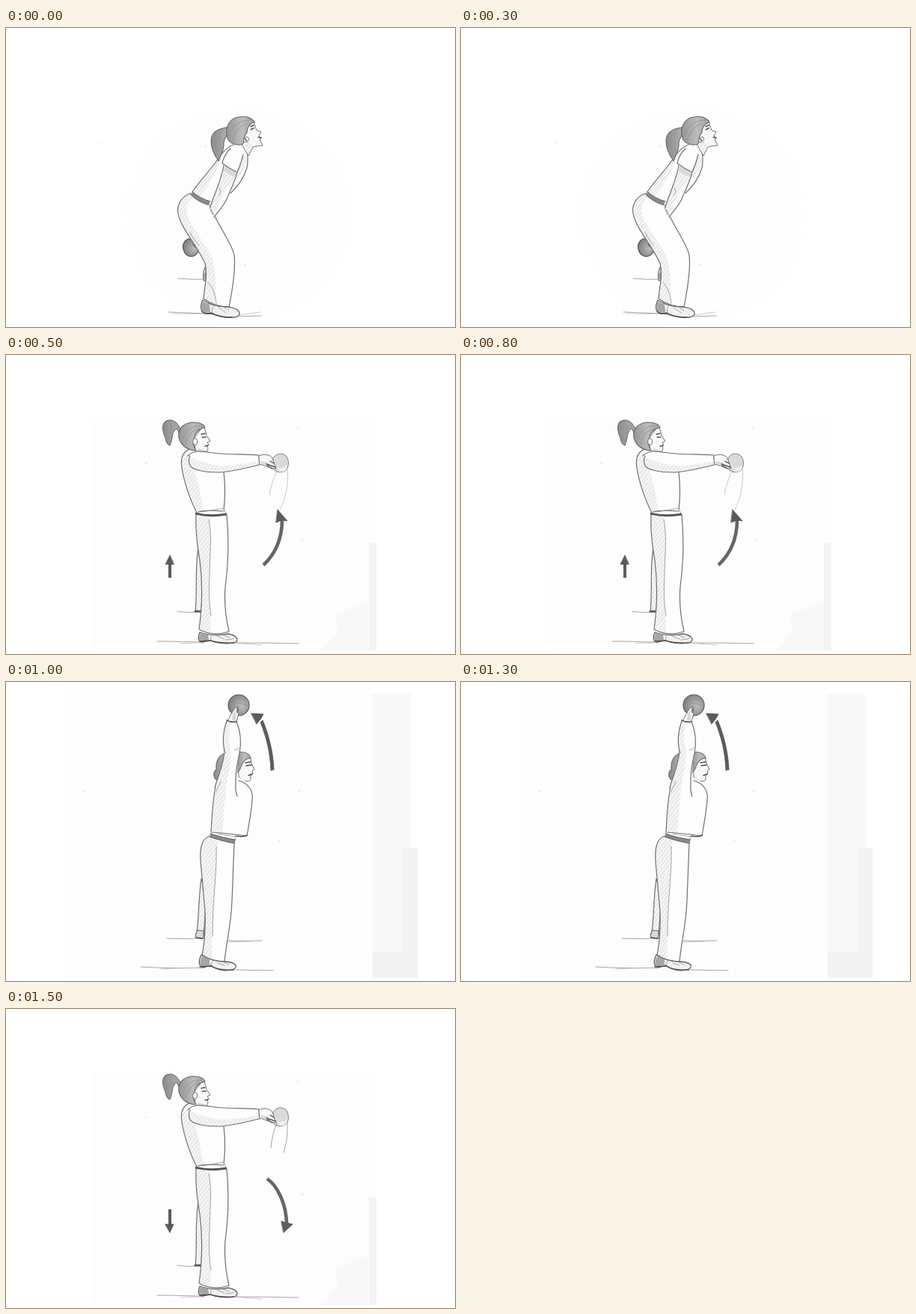
These frames come from a looping animation (600 by 400 pixels, 2 s). An HTML page:

```html
<!DOCTYPE html>
<html lang="en">
<head>
<meta charset="utf-8">
<title>Kettlebell swing</title>
<style>
html, body { margin: 0; width: 100%; height: 100%; overflow: hidden; background: #fff; }
svg { display: block; width: 600px; height: 400px; }
path { fill: none; stroke-linecap: round; stroke-linejoin: round; }
.line { stroke: #707070; stroke-width: 1.2; }
.fine { stroke: #909090; stroke-width: .8; }
.faint { stroke: #bcbcbc; stroke-width: .8; }
.dark { stroke: #505050; stroke-width: 1.4; }
.white { fill: #fdfdfd; }
.skin { fill: #f8f8f8; stroke: #707070; stroke-width: 1; }
.hatch { fill: url(#hatch); }
.shade { fill: url(#shade); }
.hair { fill: url(#hair); stroke: #6a6a6a; stroke-width: 1.1; }
.lock { fill: url(#lock); stroke: #6a6a6a; stroke-width: 1.1; }
.ball { fill: url(#ball); stroke: #585858; stroke-width: 1.2; }
.pale { fill: #dadada; stroke: #808080; stroke-width: 1; }
.shoe { fill: #f1f1f1; stroke: #606060; stroke-width: 1.3; }
.heel { fill: #a6a6a6; }
.solid { fill: #5c5c5c; stroke: #525252; stroke-width: .8; }
.belt { stroke: #565656; stroke-width: 3; stroke-linecap: butt; }
.sash { stroke: #8a8a8a; stroke-width: 5; stroke-linecap: butt; }
.rim { stroke: #606060; stroke-width: 1; }
.wide { stroke: #666; stroke-width: 4.6; stroke-linecap: butt; }
.bar { stroke: #5c5c5c; stroke-width: 4; stroke-linecap: butt; }
.paper { fill: #fdfdfd; }
.tint { fill: #f8f8f9; }
.edge { fill: #f3f3f4; }
</style>
</head>
<body>
<svg viewBox="0 0 600 400">
  <defs>
    <pattern id="hatch" width="4" height="4" patternUnits="userSpaceOnUse" patternTransform="rotate(38)">
      <rect width="4" height="4" fill="#f7f7f7"/><path d="M2 0V4" stroke="#d4d4d4" stroke-width=".9"/>
    </pattern>
    <pattern id="shade" width="3" height="3" patternUnits="userSpaceOnUse" patternTransform="rotate(32)">
      <rect width="3" height="3" fill="#e2e2e2"/><path d="M1 0V3" stroke="#c4c4c4"/>
    </pattern>
    <linearGradient id="hair">
      <stop stop-color="#969696"/><stop offset=".55" stop-color="#bcbcbc"/><stop offset="1" stop-color="#a2a2a2"/>
    </linearGradient>
    <linearGradient id="lock">
      <stop stop-color="#8c8c8c"/><stop offset="1" stop-color="#b0b0b0"/>
    </linearGradient>
    <radialGradient id="ball" cx=".65" cy=".55" r=".75">
      <stop stop-color="#bdbdbd"/><stop offset="1" stop-color="#757575"/>
    </radialGradient>
    <radialGradient id="soft">
      <stop offset=".6" stop-color="#fdfdfd"/><stop offset="1" stop-color="#fff"/>
    </radialGradient>
  </defs>
  <g id="stage"></g>
</svg>
<script>
const HOLD = 500;
const stage = document.getElementById('stage');

const box = (x, y, x2, y2) => `M${x} ${y}H${x2}V${y2}H${x}Z`;
const disc = (x, y, r) => `M${x - r} ${y}a${r} ${r} 0 1 0 ${2 * r} 0a${r} ${r} 0 1 0 ${-2 * r} 0Z`;
const specks = list => list.map(([x, y]) => `M${x} ${y}h1`).join('');

function group(parts) {
  const g = document.createElementNS('http://www.w3.org/2000/svg', 'g');
  g.innerHTML = parts.map(([cls, d]) => `<path class="${cls}" d="${d}"/>`).join('');
  return stage.appendChild(g);
}

const bend = [
  ['faint', specks([[127, 155], [319, 317], [266, 158]])],
  // ground, far foot, bell
  ['fine', 'M230 335Q249 337 266 336M217 380C245 381 270 382 280 383M306 386L341 385'],
  ['faint', 'M222 382Q250 383 266 382M312 384Q325 382 340 380'],
  ['shade line', 'M268 317C264 322 263 331 264 338L271 339L273 318Z'],
  ['heel', 'M264 328L271 326L271 338L264 338Z'],
  ['ball', 'M248 282C240 281 235 288 237 296C239 304 246 308 253 304L260 296L256 287Z'],
  ['solid', 'M250 289L256 288L258 292L253 293Z'],
  // trousers
  ['white', 'M247 220C233 226 228 238 230 248C233 267 254 288 266 315C270 330 265 348 264 362Q279 373 298 373C303 348 307 322 305 304C302 288 283 264 273 238Z'],
  ['hatch', 'M247 221C234 227 229 239 231 249C235 268 256 290 267 317C270 335 266 350 264 362L279 369C282 345 279 325 276 309C268 289 247 268 242 249Q239 234 253 226Z'],
  ['line', 'M247 221C233 226 228 238 230 248C233 267 254 288 266 315C270 330 265 348 264 362Q279 373 298 373C303 348 307 322 305 304C302 288 283 264 273 239'],
  ['fine', 'M270 340C277 348 280 358 281 369M246 273Q251 284 258 291M276 250Q272 243 272 236'],
  // shirt
  ['white', 'M313 154C299 155 292 163 285 173C274 189 261 202 249 219Q260 231 273 235L301 220C312 210 319 199 322 187Q324 169 319 157Z'],
  ['hatch', 'M297 160C285 171 270 194 250 219L258 226C272 209 283 190 290 170Z'],
  ['line', 'M314 154C299 155 292 163 285 173C274 189 261 202 249 219M319 156Q325 170 322 187C318 200 311 211 300 221'],
  // arm
  ['white', 'M291 183C287 207 276 227 273 240L279 253C286 242 293 235 298 222L309 193Z'],
  ['hatch', 'M292 184L309 193L303 206C292 216 286 232 280 246L274 240C278 225 287 207 292 184Z'],
  ['shade', 'M292 185L308 193L306 199Q298 197 291 191Z'],
  ['line', 'M291 184C287 207 276 227 273 240M309 193C304 211 298 220 295 229C290 239 284 245 278 253'],
  ['fine', 'M285 214Q289 219 284 224M275 243L278 251'],
  ['white', 'M298 160C293 167 290 175 289 181Q298 188 309 193C313 185 318 173 318 160Z'],
  ['hatch', 'M309 193C313 184 317 176 319 165L322 177C319 189 315 196 309 201Z'],
  ['line', 'M300 161C294 167 290 175 289 181Q298 188 309 193C312 186 315 178 317 169'],
  ['sash', 'M248 221Q258 231 272 234'],
  ['rim', 'M249 219Q259 228 273 232M247 223Q257 233 271 237'],
  // head
  ['lock', 'M295 133C281 135 274 141 274 151C274 161 279 171 284 178C287 169 292 164 291 153C292 146 298 144 295 133Z'],
  ['fine', 'M281 139Q278 155 284 172M288 136Q282 148 287 165'],
  ['skin', 'M331 124L333 132L335 137L341 139L338 144L341 147L339 149L343 157C338 158 333 158 330 159L324 171L314 154L319 137Z'],
  ['hair', 'M297 150C291 136 297 121 311 119C322 117 329 121 332 126C327 127 322 132 322 140C317 144 318 150 317 155C309 158 301 155 297 150Z'],
  ['fine', 'M299 143C303 129 315 123 328 123M302 150C307 138 313 129 323 128'],
  ['skin', 'M319 147C324 143 327 149 322 153L318 152'],
  ['hatch', 'M324 151L330 158L324 169L319 157Z'],
  ['dark', 'M327 136L331 134M337 146L341 147M327 132L331 130M319 148L322 151'],
  // shoe
  ['shoe', 'M263 364C259 372 260 380 266 382L275 381C284 387 296 388 305 387C313 386 314 381 309 377C305 374 300 374 296 373Q279 374 263 364Z'],
  ['heel', 'M263 366C260 373 261 379 266 381L273 380L272 370Z'],
  ['dark', 'M262 379Q265 383 275 382Q286 387 302 387'],
  ['fine', 'M276 381Q274 374 278 371M284 374L294 381M292 374L298 378']
];

const level = [
  ['paper', box(112, 82, 495, 396)],
  ['tint', 'M440 347L484 330V396H420L443 370Z'],
  ['edge', box(485, 252, 495, 396)],
  ['faint', specks([[187, 145], [390, 97], [395, 248]])],
  ['fine', 'M229 343Q245 345 253 344M202 383C225 383 245 384 262 384M304 385Q350 385 391 386'],
  ['faint', 'M233 386Q250 385 264 385M302 385L342 388'],
  // legs
  ['hatch line', 'M257 257C252 290 256 316 253 343L261 343L264 275Z'],
  ['solid', 'M253 342L261 342L261 344L252 344Z'],
  ['white', 'M254 214C253 237 256 256 259 275C263 306 262 338 258 367Q276 377 298 370C294 353 291 335 293 310C297 280 298 245 295 214Z'],
  ['hatch', 'M254 215C253 237 256 256 259 275C263 306 262 338 258 367L273 371C275 350 270 320 272 295C273 270 276 245 271 217Z'],
  ['line', 'M254 214C253 237 256 256 259 275C263 306 262 338 258 367Q276 377 298 370C294 353 291 335 293 310C297 280 298 245 295 214'],
  ['fine', 'M271 220C276 245 272 270 272 295Q270 328 274 349'],
  // shirt
  ['white', 'M243 126C235 130 233 139 235 151C238 171 247 196 255 211L291 208Q294 182 291 157Z'],
  ['hatch', 'M243 128C235 132 233 140 235 151C238 171 247 196 255 211L264 209C260 193 259 171 251 153L245 133Z'],
  ['line', 'M245 126C235 130 233 139 235 151C238 171 247 196 255 211M291 157Q294 182 291 207M257 210Q268 207 291 209'],
  ['fine', 'M262 210Q278 207 290 205M292 207L294 213'],
  ['belt', 'M253 212Q272 217 295 213'],
  // head
  ['lock', 'M233 99C229 89 220 84 213 89C207 94 210 104 213 111Q214 119 219 121C223 113 221 106 225 101Q228 95 231 104Z'],
  ['fine', 'M214 94Q215 109 219 117M219 90Q223 98 220 106M225 92L230 98'],
  ['skin', 'M264 95L267 103L268 108L273 115L269 117L271 120L269 122L270 125L268 130C262 131 257 130 253 127L251 112Z'],
  ['hair', 'M254 128C242 127 234 121 231 111C229 98 238 91 249 90C257 90 264 92 266 97C259 98 252 104 252 111C248 114 250 122 254 128Z'],
  ['fine', 'M236 113C240 99 251 94 262 95M240 119C243 106 250 100 259 98'],
  ['skin', 'M251 112C257 110 257 118 253 121L250 118'],
  ['dark', 'M262 110L267 110M261 106L266 105M266 122L270 121'],
  ['shade', 'M257 125L267 128L267 131L255 129Z'],
  // arm, hand and bell
  ['white', 'M246 132C253 126 264 129 277 131C299 134 318 132 338 134L339 147C320 151 300 157 283 157C267 157 249 154 246 148Q243 140 246 132Z'],
  ['hatch', 'M247 137C258 142 277 148 292 148C309 147 323 145 338 142V147C320 151 300 157 283 157C267 157 249 154 246 148Z'],
  ['line', 'M243 135C251 126 264 129 277 131C299 134 318 132 338 134L339 147C320 151 300 157 283 157C267 157 249 154 246 148Q243 141 246 135'],
  ['pale', 'M357 138C361 131 370 130 375 136C379 143 378 151 373 155C367 158 360 157 357 152Z'],
  ['hatch', 'M362 150Q370 153 376 146Q376 158 365 156Z'],
  ['skin', 'M338 135C345 131 354 134 356 138L359 147L361 152C355 153 348 148 339 146Z'],
  ['shade', 'M341 142L350 144L354 149L340 145Z'],
  ['dark', 'M348 146L360 150M353 142L358 145M349 148L356 152'],
  // shoe
  ['shoe', 'M259 371C256 378 257 384 262 384L273 382C282 386 300 387 307 384C312 380 307 375 297 373Q277 377 259 371Z'],
  ['heel', 'M260 372C257 378 258 383 262 383L271 381L270 374Z'],
  ['dark', 'M259 383L273 382Q287 386 304 385'],
  ['fine', 'M274 381Q272 377 277 374M282 376L292 380M288 374L299 378M294 381Q301 381 305 379']
];

const rise = [
  ...level,
  ['faint', 'M363 153C358 164 354 174 352 187M376 152C378 172 374 191 366 207'],
  ['wide', 'M344 281C359 267 369 247 369 220'],
  ['solid', 'M363 207L376 222L369 221L361 224Z'],
  ['bar', 'M219 298V278'],
  ['solid', 'M219 268L213 280L224 280Z']
];

const lower = [
  ...level,
  ['fine', 'M362 153C357 164 355 175 354 186M376 152Q377 174 371 192'],
  ['wide', 'M349 227C363 237 374 260 375 286'],
  ['solid', 'M368 284L375 286L383 288L371 299Z'],
  ['bar', 'M219 268V290'],
  ['solid', 'M213 288L224 288L219 299Z']
];

const overhead = [
  ['paper', box(77, 16, 490, 396)],
  ['tint', box(490, 16, 541, 396)],
  ['edge', 'M529 222H550V396H490V361H529Z'],
  ['faint', specks([[104, 146], [365, 213], [391, 146]])],
  ['fine', 'M215 343Q240 344 254 343M297 346Q320 347 342 346M180 381C210 383 240 383 263 382M304 385L357 386'],
  ['faint', 'M207 384Q240 382 262 383M297 348L326 347'],
  // legs
  ['hatch line', 'M261 263C257 290 258 315 255 334L264 340L268 285Z'],
  ['shade line', 'M256 332C253 337 252 342 256 343L264 343L264 333Z'],
  ['dark', 'M254 342L263 343'],
  ['white', 'M272 206C261 210 259 223 260 240C262 264 264 286 266 307Q267 342 262 365Q274 374 292 374C294 350 301 325 302 292C303 262 304 243 305 214Z'],
  ['hatch', 'M272 207C261 211 259 223 260 240C262 264 264 286 266 307Q267 342 262 365L275 371C276 345 276 315 278 292C281 264 280 235 283 212Z'],
  ['line', 'M272 206C261 210 259 223 260 240C262 264 264 286 266 307Q267 342 262 365Q274 374 292 374C294 350 301 325 302 292C303 262 304 243 305 214'],
  ['fine', 'M281 220C282 260 276 287 276 340'],
  // shirt
  ['white', 'M280 137C276 160 275 181 274 201Q302 203 322 206C325 188 328 172 329 158C331 145 323 135 311 132Z'],
  ['hatch', 'M280 142C276 160 275 181 274 201L289 202C291 184 290 163 295 146Z'],
  ['line', 'M280 140C276 160 275 181 274 201Q302 203 322 206C325 188 328 172 329 158C331 145 323 135 311 132'],
  ['fine', 'M274 202L273 206M307 205L306 213M283 203L308 207'],
  ['dark', 'M308 206Q315 208 322 205'],
  ['sash', 'M273 205Q288 211 306 213'],
  ['rim', 'M273 203Q288 208 306 211M272 207Q288 213 305 216'],
  // head
  ['lock', 'M293 95C284 98 280 107 281 117C276 121 277 129 282 131C286 129 284 126 286 122L293 116Z'],
  ['skin', 'M323 97L327 103L328 109L332 117L329 119L330 123L327 125L327 130C325 135 319 133 311 127L311 108Z'],
  ['hair', 'M311 94C320 93 326 96 327 102C319 102 316 108 313 116L309 122Z'],
  ['dark', 'M321 112L328 111M320 108L327 107M324 125L329 123'],
  ['hatch', 'M311 119L316 129L325 132L313 132Z'],
  // arms and bell
  ['white', 'M295 52C290 66 289 80 292 93C290 114 282 128 279 150L308 152C309 129 309 110 312 95C315 80 312 64 308 53Z'],
  ['hatch', 'M295 53C290 66 289 80 292 93C290 114 282 128 279 151H293C295 128 302 107 301 92C297 78 297 66 301 54Z'],
  ['line', 'M295 52C290 66 289 80 292 93C290 114 282 128 279 142M308 53C313 65 315 80 312 95C309 110 306 121 307 136Q306 145 309 153'],
  ['fine', 'M305 91Q309 91 311 88M291 91L294 95M287 133L280 148'],
  ['ball', disc(311, 31, 14)],
  ['fine', 'M301 25Q311 16 320 25M300 32Q309 25 323 32'],
  ['skin', 'M296 52L301 43Q306 33 310 33L311 42L308 53Z'],
  ['shade', 'M303 43L307 37L307 52L302 51Z'],
  ['dark', 'M295 51Q301 55 308 53M309 35V41'],
  // arrow
  ['solid', 'M354 118C353 94 348 74 340 54L343 51C351 70 357 93 358 117Z'],
  ['solid', 'M328 42L344 43L340 50L335 56Z'],
  // shoe
  ['shoe', 'M261 365C257 373 257 380 263 382L274 379C281 386 299 388 306 383C311 378 302 374 291 374Q275 374 261 365Z'],
  ['heel', 'M262 367C258 374 259 380 263 381L272 378L272 371Z'],
  ['dark', 'M259 381L274 380Q284 386 304 385'],
  ['fine', 'M274 379Q274 374 279 372M283 376L292 379M289 374L298 378']
];

const poses = [bend, rise, overhead, lower].map(group);
poses[0].insertAdjacentHTML('afterbegin', '<ellipse cx="310" cy="250" rx="170" ry="160" fill="url(#soft)"/>');

function draw(ms) {
  const now = Math.floor(ms / HOLD) % poses.length;
  poses.forEach((g, i) => g.setAttribute('display', i === now ? 'inline' : 'none'));
}

const start = performance.now();
function tick() {
  draw(performance.now() - start);
  requestAnimationFrame(tick);
}
tick();
</script>
</body>
</html>
```
